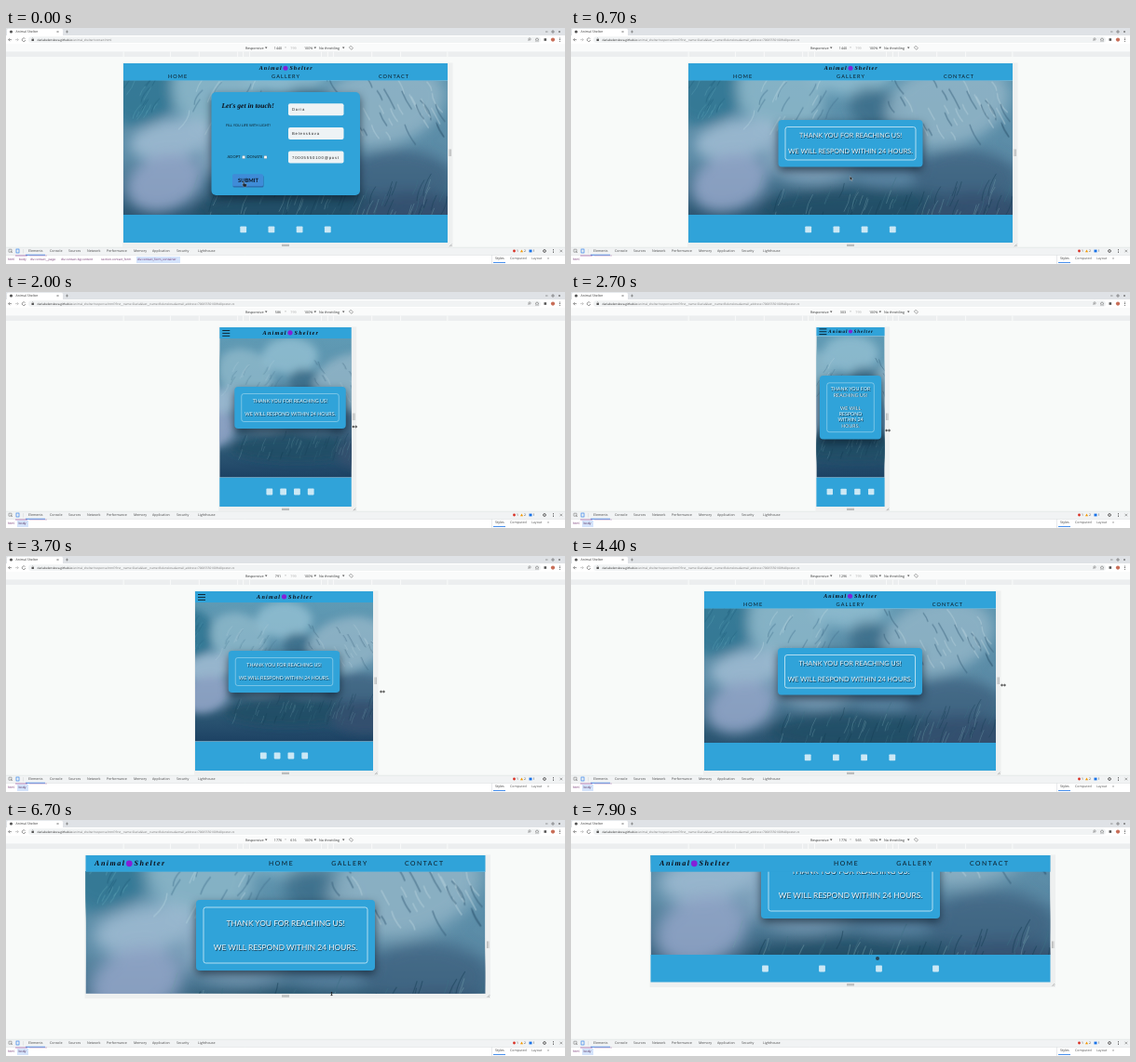
Write an HTML page that moves like this. It is 600 px wide and 254 px high and loops after 8 s.

```html
<!DOCTYPE html>
<html lang="en">
<head>
<meta charset="utf-8">
<title>Animal Shelter</title>
<style>
html, body { margin: 0; width: 100%; height: 100%; overflow: hidden; background: #f8faf9; }
svg { display: block; }
text { font-family: "Open Sans", sans-serif; text-rendering: geometricPrecision; white-space: pre; }
.lato { font-family: Lato, sans-serif; }
.script { font-family: "Liberation Serif", serif; font-weight: bold; font-style: italic; }
.field { font-family: "Liberation Sans", sans-serif; letter-spacing: .82px; }
.card { fill: #30a3d9; filter: drop-shadow(0 4px 5px rgba(5, 20, 35, .65)); }
</style>
</head>
<body>
<svg id="stage" width="100%" height="100%" viewBox="0 0 600 254">
  <defs>
    <clipPath id="view"><rect id="viewRect" x="126" y="38" width="348" height="193"/></clipPath>
    <filter id="soft" x="-30%" y="-30%" width="160%" height="160%"><feGaussianBlur stdDeviation="6"/></filter>
    <linearGradient id="tint" x1="0" y1="0" x2="0" y2="1">
      <stop offset="0" stop-color="#5f9ab4"/><stop offset=".55" stop-color="#5b8aa5"/>
      <stop offset=".8" stop-color="#2d5874"/><stop offset="1" stop-color="#1d4264"/>
    </linearGradient>
  </defs>
  <rect width="600" height="254" fill="#f8faf9"/>
  <g id="chrome"></g>
  <g id="frame"></g>
  <g clip-path="url(#view)">
    <svg id="photo" viewBox="0 0 300 200" preserveAspectRatio="xMidYMid slice"></svg>
    <g id="page"></g>
  </g>
  <g id="live"></g>
</svg>
<script>
const LOOP = 8000, TOP = 38, SCALE = 0.2415, BLUE = '#30a3d9';
const $ = id => document.getElementById(id);

const rect = (x, y, w, h, fill, more = '') =>
  `<rect x="${x}" y="${y}" width="${w}" height="${h}" fill="${fill}" ${more}/>`;
const dot = (x, y, r, fill, more = '') => `<circle cx="${x}" cy="${y}" r="${r}" fill="${fill}" ${more}/>`;
const line = (d, color, width = .6, more = '') =>
  `<path d="${d}" fill="none" stroke="${color}" stroke-width="${width}" ${more}/>`;
const text = (x, y, size, str, fill = '#333', more = '') =>
  `<text x="${x}" y="${y}" font-size="${size}" fill="${fill}" ${more}>${str}</text>`;
const MID = 'text-anchor="middle"';

// Piecewise linear value through [time, value] points.
function track(points, t) {
  let [t0, v0] = points[0];
  for (const [t1, v1] of points) {
    if (t <= t1) return t1 === t0 ? v1 : v0 + (v1 - v0) * (t - t0) / (t1 - t0);
    [t0, v0] = [t1, v1];
  }
  return v0;
}

const WIDTH = [[0, 348], [1190, 348], [1500, 257], [1800, 171], [2200, 112], [2600, 73.2], [2720, 73.2],
  [2850, 75.5], [3020, 75.5], [3700, 191], [3900, 210], [4400, 313], [4700, 429]];
const CENTER = [[0, 300], [3050, 300], [3700, 298.5], [4400, 299.5], [4700, 300]];
const HEIGHT = [[0, 193], [6030, 193], [6700, 148.7], [6900, 136.5]];
const SCROLL = [[0, 0], [7050, 0], [7250, 12], [7600, 42], [7900, 56]];

function drawPhoto() {
  let seed = 11;
  const rnd = () => (seed = seed * 16807 % 2147483647) / 2147483647;
  const blob = (x, y, rx, ry, fill, o = .8, turn = 0) =>
    `<ellipse cx="${x}" cy="${y}" rx="${rx}" ry="${ry}" fill="${fill}" opacity="${o}" transform="rotate(${turn} ${x} ${y})"/>`;
  const strands = (n, x, y, w, h, dx, dy, colors, width) => {
    let out = '';
    for (let i = 0; i < n; i++) {
      const px = x + rnd() * w, py = y + rnd() * h, k = .5 + rnd();
      out += line(`M${px} ${py}q${dx * k * rnd()} ${dy * k * .5} ${dx * k} ${dy * k}`,
        colors[i % colors.length], width, 'opacity=".45"');
    }
    return out;
  };
  $('photo').innerHTML = rect(0, 0, 300, 200, 'url(#tint)') +
    '<g filter="url(#soft)">' +
    blob(14, 45, 36, 36, '#2c7390') +
    blob(85, 50, 42, 34, '#8fb9cb', .8, 25) +
    blob(150, 25, 40, 26, '#9cc6d8', .7) +
    blob(175, 66, 28, 20, '#356680', .7, 30) +
    blob(240, 60, 58, 38, '#95b7c9', .8, -15) +
    blob(45, 92, 40, 18, '#a6c0d6', .8, -10) +
    blob(38, 132, 36, 26, '#91a5c6', .9, -20) +
    blob(115, 108, 45, 25, '#8cabc4', .8) +
    blob(185, 118, 36, 18, '#5f87a5', .8) +
    blob(255, 128, 48, 26, '#3f6280', .8) +
    blob(160, 158, 95, 20, '#1f4d64', .85) +
    blob(265, 165, 50, 24, '#34506f', .9) +
    '</g>' +
    strands(38, 185, 30, 105, 60, 7, 13, ['#365d78', '#b5d0dc'], 1.3) +
    strands(22, 60, 30, 80, 45, -8, 14, ['#447490', '#b3d2de'], 1.1) +
    strands(22, 0, 30, 30, 45, 7, -12, ['#5fa3b6', '#1e5c78'], .8) +
    strands(75, 60, 142, 235, 35, 5, -14, ['#6f9ba8', '#153c52', '#3f7285'], .8);
}

function drawChrome() {
  const caret = (x, y) => `<path d="M${x} ${y}h2.4l-1.2 1.8z" fill="#444"/>`;
  const tabs = [[24, 'Elements'], [47, 'Console'], [67, 'Sources'], [87, 'Network'], [108, 'Performance'],
    [137, 'Memory'], [157, 'Application'], [183, 'Security'], [206, 'Lighthouse']];
  let s = rect(0, 0, 600, 8, '#dfe2e6') + rect(1, .8, 60, 8, '#fff', 'rx="1.5"') +
    dot(5.5, 4, 1.6, '#555') + text(10.5, 5.2, 3.5, 'Animal Shelter') +
    line('M54.5 3l2 2m0-2l-2 2M64 4h3m-1.5-1.5v3', '#555', .5) +
    line('M579 4h2.5M586 3h2v2h-2zM593 3l2 2m0-2l-2 2', '#444', .5) +
    rect(0, 8, 600, 9, '#fff') + rect(24, 9.2, 550, 6.8, '#f1f3f4', 'rx="3.4"') +
    line('M6 12.6H2.7l1.5-1.6m-1.5 1.6l1.5 1.6', '#555') +
    line('M10 12.6h3.3l-1.5-1.6m1.5 1.6l-1.5 1.6', '#aaa') +
    line('M20.5 11.6a1.8 1.8 0 1 0 .3 1.4', '#555') +
    rect(27.5, 12, 2.4, 2, '#555') + line('M28 12v-.7q.7-1 1.4 0v.7', '#555', .4) +
    line('M560.5 13.5l1-1', '#666') + dot(562, 12, 1.2, 'none', 'stroke="#666" stroke-width=".5"') +
    line('M570 10.6l.6 1.3 1.4.1-1 1 .3 1.4-1.3-.7-1.3.7.3-1.4-1-1 1.4-.1z', '#555', .4) +
    rect(577.5, 11.2, 2.6, 2.6, '#555') + dot(587, 12.6, 2.1, '#c86d57') +
    [11, 12.6, 14.2].map(y => dot(594.5, y, .5, '#444')).join('') +
    rect(0, 17, 600, 8, '#fafbfb') +
    text(257, 22.5, 3.7, 'Responsive') + caret(278, 20.4) +
    text(300, 22.4, 3.6, '×', '#999', MID) +
    text(320, 22.5, 3.7, '100%') + caret(330.6, 20.4) +
    text(336, 22.5, 3.7, 'No throttling') + caret(361, 20.4) +
    rect(369.2, 19.6, 2.4, 3.4, 'none', 'stroke="#555" stroke-width=".5" transform="rotate(-45 370.4 21.3)"') +
    rect(0, 25.5, 600, 5.5, '#eceeef');
  for (const px of [320, 375, 425, 768, 1024, 1440])
    for (const side of [-1, 1]) s += rect(299.6 + side * px * SCALE / 2, 25.5, .8, 5.5, '#fcfdfd');

  s += rect(0, 236, 600, 8.5, '#f1f3f4') + rect(0, 244.5, 600, 9.5, '#fff') +
    line('M0 236.2H600M0 244.5H600', '#cfd3d6', .4) +
    line('M3 238.2h3v3h-3zM5 240l2 2', '#666', .5) +
    rect(11, 238, 3, 4, 'none', 'stroke="#1a73e8" stroke-width=".6"') + line('M18.5 238v4.5', '#ccc', .4) +
    tabs.map(([x, name]) => text(x, 241.4, 3.6, name, '#444')).join('') +
    rect(21, 243.8, 21, .8, '#1a73e8') +
    dot(545.5, 240, 1.4, '#d93025') + text(548, 241.3, 3.4, '1') +
    '<path d="M552 241.3l1.5-2.8 1.5 2.8z" fill="#f29900"/>' + text(556, 241.3, 3.4, '2') +
    rect(561.5, 238.6, 3, 2.8, '#1a73e8') + text(565.8, 241.3, 3.4, '1') +
    dot(578, 240, 1.4, 'none', 'stroke="#555" stroke-width=".9"') +
    [238.4, 240, 241.6].map(y => dot(587.5, y, .5, '#444')).join('') +
    line('M594.5 238.7l2.6 2.6m0-2.6l-2.6 2.6', '#555', .5) +
    line('M521.5 244.5V254', '#cfd3d6', .5) +
    text(525, 249.4, 3.6, 'Styles') + text(541, 249.4, 3.6, 'Computed', '#555') +
    text(564, 249.4, 3.6, 'Layout', '#555') + text(581, 249.3, 4, '»', '#555') +
    rect(523, 252, 13, .8, '#1a73e8') +
    rect(10, 244.7, 13, .6, '#8a3a93') + rect(25, 244.7, 19, .6, '#b48ab8');
  $('chrome').innerHTML = s;
}

function logo(x, y, size, gap, spacing) {
  const style = `class="script" letter-spacing="${spacing}"`;
  return text(x - gap + spacing, y + size * .3, size, 'Animal', '#0b0b14', style + ' text-anchor="end"') +
    dot(x, y, size * .42, '#8420d8') +
    text(x + gap, y + size * .3, size, 'Shelter', '#0b0b14', style);
}

// Layout values for each breakpoint.
function layout(w) {
  if (w > 362) return { wide: true, head: 17.7, foot: 201, icons: 61, iconY: 15,
    card: [192, 86, 76], pad: 8, font: 8.4, rows: [111, 137] };
  if (w > 217) return { head: 18.5, foot: 201, icons: 30.2, iconY: 15.8,
    card: [155, 99, 50.5], pad: 7.5, font: 7.27, rows: [115.5, 132.3] };
  if (w > 126) return { menu: 8, head: 12, foot: 199.7, icons: 14.8, iconY: 15.3,
    card: [119.5, 102, 45], pad: 7.5, font: 5.3, rows: [117.3, 131.3] };
  return { menu: 8, tiny: true, head: 9.3, foot: 199.7, icons: 14.8, iconY: 15.3,
    card: [w - 7, 90, 68.5], pad: 7.8, font: 5.3, rows: [104, 110.7, 124.8, 131, 137.2, 143.6] };
}

function header(L, x, w) {
  const c = x + w / 2;
  let s = rect(x - 1, TOP, w + 2, L.head, BLUE);
  const nav = (at, y, size, gap) => ['HOME', 'GALLERY', 'CONTACT'].map((name, i) =>
    text(x + w * at[i] + gap / 2, y, size, name, '#0c1a24', `class="lato" letter-spacing="${gap}" ${MID}`)).join('');
  if (L.wide) return s + logo(x + 46.8, 46.8, 8, 5.3, 1.5) + nav([.488, .659, .846], 48.8, 6.8, 1.55);
  if (!L.menu) return s + logo(c, 43.3, 6, 4.4, 1.1) + nav([1 / 6, .5, 5 / 6], 54.1, 5.5, 1.1);
  const y = L.tiny ? 39.4 : 41;
  s += [0, 2.9, 5.8].map(d => rect(x + 3, y + d, L.menu, .9, '#0b1822')).join('');
  return s + (L.tiny ? logo(c, 42.5, 5, 3.6, .95) : logo(c, 43.8, 6.2, 4.5, 1.2));
}

function thanks(L, c) {
  const [w, y, h] = L.card, p = L.pad;
  const rows = L.tiny
    ? ['THANK YOU FOR', 'REACHING US!', 'WE WILL', 'RESPOND', 'WITHIN 24', 'HOURS.']
    : ['THANK YOU FOR REACHING US!', 'WE WILL RESPOND WITHIN 24 HOURS.'];
  const type = `class="lato" ${MID}`;
  return rect(c - w / 2, y, w, h, BLUE, 'rx="4" class="card"') +
    rect(c - w / 2 + p, y + p, w - 2 * p, h - 2 * p, 'none',
      `rx="2.5" stroke="#d3ecf7" stroke-width="${L.menu ? .45 : .8}"`) +
    rows.map((r, i) => {
      const b = L.rows[i] + L.font * .36;
      return text(c + .6, b + .6, L.font, r, '#123a52', type) + text(c, b, L.font, r, '#eef7fb', type);
    }).join('');
}

function form(pressed) {
  const lato = 'class="lato"', d = pressed ? .6 : 0;
  const field = (y, value) => rect(303, y, 59.5, 13, '#eef3f5', 'rx="2"') +
    text(307, y + 8, 4.2, value, '#222', 'class="field"');
  return rect(220.5, 69, 159.5, 111, BLUE, 'rx="5" class="card"') +
    text(231.5, 85.5, 7.5, "Let's get in touch!", '#0b0b14', 'class="script"') +
    text(236, 106, 3.77, 'FILL YOU LIFE WITH LIGHT!', '#10202a', lato) +
    text(237.5, 140.4, 4.1, 'ADOPT', '#10202a', lato) + text(258.5, 140.4, 4.1, 'DONATE', '#10202a', lato) +
    [253.6, 277].map(x => rect(x, 137.5, 3, 3, '#fff', 'rx=".5" stroke="#777" stroke-width=".3"')).join('') +
    field(81.3, 'Daria') + field(107, 'Belenskova') + field(132.6, '70005550100@post') +
    rect(243.5, 158.5, 33, 13, '#2b68a8', 'rx="1.5"') + rect(243, 157.2 + d, 33, 13, '#3f8cd8', 'rx="1.5"') +
    text(260, 166 + d, 5.8, 'SUBMIT', '#0b1420', `${lato} font-weight="bold" ${MID}`);
}

function footer(L, x, w) {
  const c = x + w / 2, r = L.tiny ? 3.2 : 3.4;
  return rect(x - 1, L.foot, w + 2, 40, BLUE) +
    [-1.5, -.5, .5, 1.5].map(k =>
      rect(c + k * L.icons - r, L.foot + L.iconY - r, 2 * r, 2 * r, '#cbe8f5', 'rx=".8"')).join('');
}

function cursor(t, right, bottom) {
  const sideways = (x, y) => line(`M${x - 2.2} ${y}h4.4M${x - 1.2} ${y - 1.1}l-1.2 1.1 1.2 1.1M${x + 1.2} ${y - 1.1}l1.2 1.1-1.2 1.1`, '#111', .8);
  const arrow = (x, y) => `<path d="M${x} ${y}v4.2l1-.9.8 1.7.7-.3-.8-1.7h1.4z" fill="#111" stroke="#fff" stroke-width=".3"/>`;
  if (t < 600) return `<path d="M254.5 165.2v3l-1.2-.3 1.8 3h2.8l.6-2.8-2.8-.7v-2.2z" fill="#1c2733" stroke="#fff" stroke-width=".2"/>`;
  if (t < 1150) return arrow(track([[600, 255], [1100, 477]], t), track([[600, 166], [1100, 134]], t));
  if (t < 1900) return '';
  if (t < 4800) return sideways(right + track([[2000, 3.5], [2900, 3.5], [3700, 10], [4400, 8], [4700, 4]], t),
    track([[2000, 145], [2700, 149], [3700, 146], [4400, 139], [4700, 137]], t));
  if (t < 6000) return arrow(track([[4800, 517], [5500, 511], [5650, 509], [5900, 349]], t),
    track([[4800, 137], [5500, 231]], t));
  if (t < 7050) {
    const y = bottom + .5;
    return line(`M349.5 ${y - 1.8}v3.6M348.6 ${y - .9}l.9-1 .9 1M348.6 ${y + .9}l.9 1 .9-1`, '#111', .7);
  }
  return dot(track([[7050, 349], [7400, 329]], t), track([[7050, 172], [7400, 149]], t), 2,
    '#26353f', 'opacity=".85"');
}

function crumbs(t) {
  const y = 250.4;
  if (t >= 500) return text(2, y, 3.4, 'html', '#70306e') + (t < 1000 ? '' :
    rect(12, 246, 12, 7, '#d4e3fb') + text(13.5, y, 3.4, 'body', '#4a2050'));
  return rect(140, 246, 47, 7, '#d4e3fb') +
    [[2, 'html'], [14, 'body'], [26, 'div.contact__page'], [59, 'div.contact-bg.content'],
      [102, 'section.contact_form'], [141, 'div.contact_form_container']]
      .map(([x, s]) => text(x, y, 3.3, s, '#70306e')).join('');
}

function address(t) {
  const rest = t < 500 ? 'contact.html'
    : 'response.html?first__name=Daria&amp;last__name=Belenskova&amp;email_address=70005550100%40poster.zz';
  return text(33.5, 13.8, 3.15,
    `dariabelenskova.github.io<tspan fill="#777">/animal_shelter/${rest}</tspan>`, '#222');
}

function draw(t) {
  const w = track(WIDTH, t), h = track(HEIGHT, t), c = track(CENTER, t);
  const x = c - w / 2, right = x + w, bottom = TOP + h;
  // Content reflows slightly late while the viewport shrinks.
  const lw = Math.max(w, track(WIDTH, t - 68));
  const L = layout(lw), scroll = track(SCROLL, t), heroY = TOP + L.head;

  const set = (id, box) => ['x', 'y', 'width', 'height'].forEach((k, i) => $(id).setAttribute(k, box[i]));
  set('viewRect', [x, TOP, w, h]);
  set('photo', [x, heroY - scroll, lw, L.foot - heroY]);

  $('frame').innerHTML = rect(x - 1, TOP - .5, w + 6.5, h + 6, '#eef0f0') +
    line(`M${right + 2} 130.5v7.5M${right + 3.4} 130.5v7.5`, '#999', .6) +
    line(`M296 ${bottom + 2.2}h8M296 ${bottom + 3.4}h8`, '#888', .6) +
    line(`M${right + 2} ${bottom + 4.2}l2.6-2.6m-1 2.6l1-1`, '#777', .5);
  $('page').innerHTML =
    `<g transform="translate(0 ${-scroll})">${t < 500 ? form(t > 150 && t < 350) : thanks(L, x + lw / 2)}${footer(L, x, lw)}</g>` +
    header(L, x, lw);
  $('live').innerHTML = address(t) + crumbs(t) +
    text(292, 22.5, 3.7, Math.round(w / SCALE - (w === 348 ? 1 : 0)), '#333', MID) +
    text(308.5, 22.5, 3.7, Math.round(h / SCALE), t < 6000 ? '#aaa' : '#333', MID) +
    cursor(t, right, bottom);
}

drawPhoto();
drawChrome();
draw(0);
let start;
requestAnimationFrame(function tick(now) {
  start ??= now;
  draw((now - start) % LOOP);
  requestAnimationFrame(tick);
});
</script>
</body>
</html>
```
